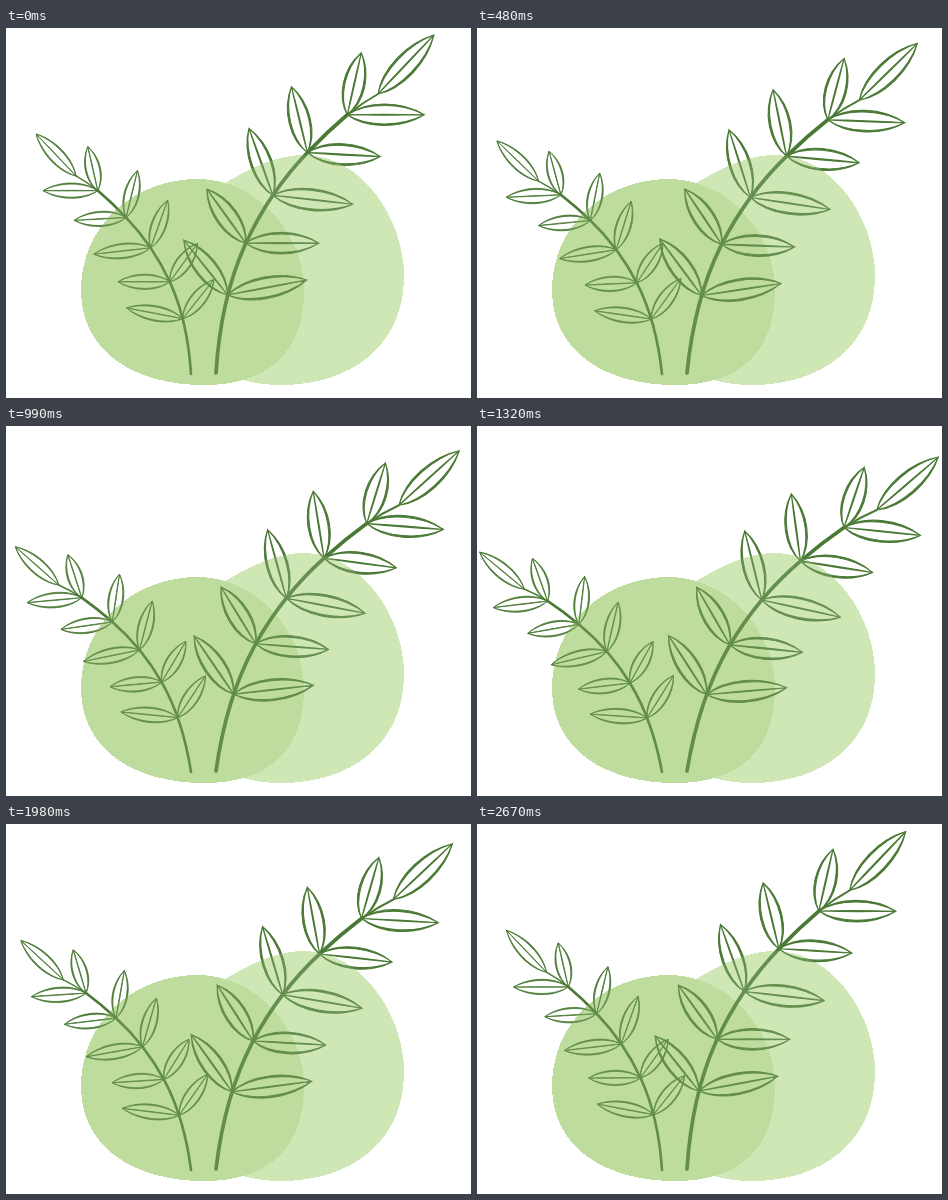
Write an HTML page that moves like this. It is 465x370 px and loops after 2.7 s.

```html
<!DOCTYPE html>
<html lang="en">
<head>
<meta charset="utf-8">
<title>Swaying branches</title>
<style>
  html, body { margin: 0; height: 100%; overflow: hidden; background: #fff; }
  svg { display: block; width: 100vw; height: 100vh; }
  #blobs { shape-rendering: crispEdges; }
  #branch { fill: none; stroke: #4b7a36; stroke-linecap: round; }
  #branch .leaf { fill: #4b7a36; fill-rule: evenodd; stroke-width: 1.1; }
</style>
</head>
<body>
<svg viewBox="0 0 465 370">
  <defs>
    <g id="branch">
      <path id="stem" stroke-width="2" d="M0 0C3 -48 12 -90 29 -128C44 -161 65 -193 92 -221Q111 -241 131 -258Q146 -270 162 -279"/>
      <use href="#stem"/>
    </g>
  </defs>
  <g id="blobs">
    <path fill="#cfe6b5" d="M298 127C355 127 398 190 398 248C398 318 345 357 275 357C260 357 248 355 237 352L219 155C245 140 270 127 298 127Z"/>
    <path fill="#bedc9e" d="M192 151C250 151 298 205 298 262C298 325 262 357 198 357C130 357 75 325 75 262C75 200 125 151 192 151Z"/>
  </g>
  <use href="#branch" class="plant"/>
  <use href="#branch" class="plant"/>
  <use href="#blobs" opacity=".2"/>
</svg>
<script>
const LOOP = 2700, STEP = 30;
const FIRST_NODE = 79, NODE_GAP = 55;

// Leaf tips relative to their node, from the lowest node to the end of the stem
const leafTips = [
  [[-44, -55], [79, -15]],
  [[-39, -54], [73, 0]],
  [[-24, -67], [80, 9]],
  [[-16, -66], [73, 4]],
  [[14, -62], [77, 0]],
  [[56, -59]]
];

// The smaller plant is the same branch, mirrored
const placements = [
  { root: "185 346", swing: -7, scale: "-.71 .71" },
  { root: "210 345", swing: 6, scale: "1" }
];

// Pointed oval along a leaf of the given length
const oval = (length, bulge) => {
  const near = length * .25, far = length * .7, side = bulge / .75;
  return `M0 0C${near} ${-side} ${far} ${-side} ${length} 0C${far} ${side} ${near} ${side} 0 0Z`;
};

// Tapered outline with a thin rib inside
function leaf(node, [dx, dy]) {
  const length = Math.hypot(dx, dy), angle = Math.atan2(dy, dx) * 180 / Math.PI;
  const shape = [10.8, 9.2, .4].map(bulge => oval(length, bulge)).join("");
  return `<path class="leaf" d="${shape}" transform="translate(${node.x} ${node.y}) rotate(${angle})"/>`;
}

const stem = document.getElementById("stem");
const distance = i => FIRST_NODE + NODE_GAP * i;
const leaves = leafTips.flatMap((tips, i) =>
  tips.map(tip => leaf(stem.getPointAtLength(distance(i)), tip))).join("");
const trunk = `<path d="${stem.getAttribute("d")}" stroke-width="3.7" stroke-dasharray="${distance(4)} 99"/>`;
document.getElementById("branch").innerHTML = trunk + stem.outerHTML + leaves;

const plants = document.querySelectorAll(".plant");

function draw(now) {
  const t = Math.floor(now / STEP) * STEP % LOOP / LOOP;
  const sway = 1 - Math.abs(1 - 2 * t);
  placements.forEach(({ root, swing, scale }, i) =>
    plants[i].setAttribute("transform", `translate(${root}) rotate(${swing * sway}) scale(${scale})`));
  requestAnimationFrame(draw);
}
draw(performance.now());
</script>
</body>
</html>
```
